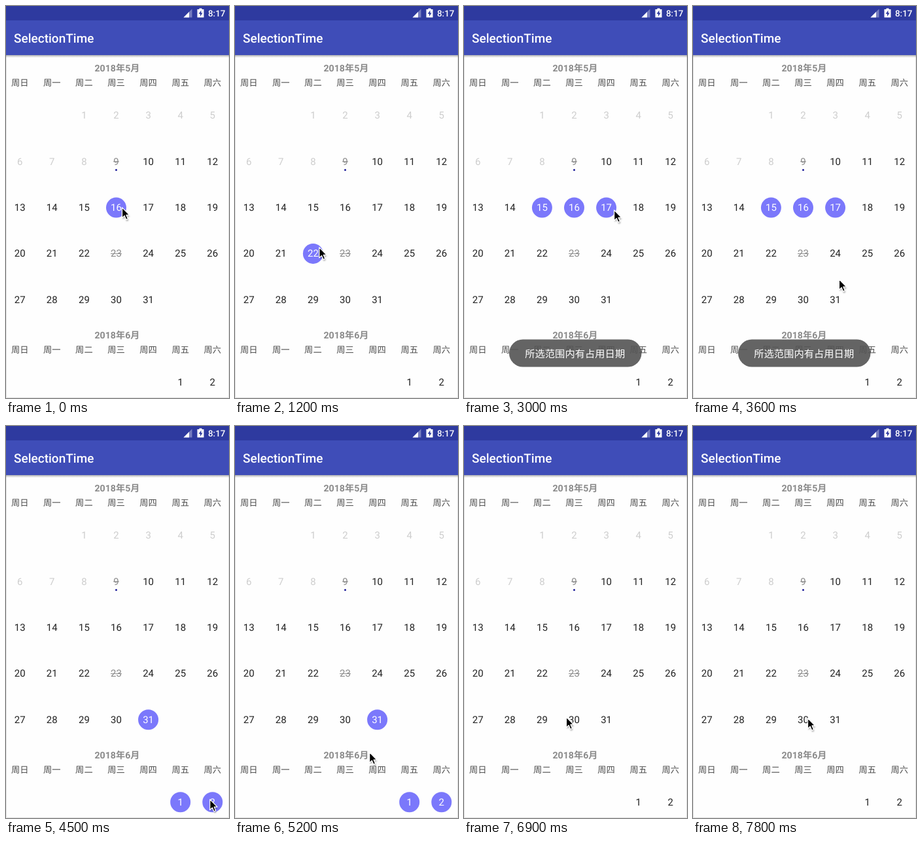
These frames come from a looping animation (341x599 px, 7900 ms). An HTML page:

```html
<!DOCTYPE html>
<html lang="zh-CN">
<head>
<meta charset="utf-8">
<title>SelectionTime</title>
<style>
  html, body { margin: 0; width: 100%; height: 100%; overflow: hidden; background: #fff; }
  svg { display: block; width: 341px; height: 599px; }
  text { font-family: Roboto, "Noto Sans CJK SC", "Noto Sans CJK", sans-serif; text-rendering: geometricPrecision; }
  .mid { text-anchor: middle; }
  .month { font-size: 14.2px; font-weight: 700; fill: #8b8b8b; }
  .week { font-size: 13.3px; fill: #4c4c4c; }
  .day { font-size: 15px; fill: #222; }
  .past { fill: #cdcdcd; }
  .busy { fill: #8a8a8a; }
  .mark { fill: #7b78fb; visibility: hidden; }
  .on .mark { visibility: visible; }
  .on .day { fill: #fff; }
</style>
</head>
<body>
<svg viewBox="0 0 341 599">
  <defs>
    <linearGradient id="shade" x2="0" y2="1">
      <stop offset="0" stop-color="#000" stop-opacity=".3"/>
      <stop offset="1" stop-color="#000" stop-opacity="0"/>
    </linearGradient>
    <filter id="soft" x="-50%" y="-50%" width="200%" height="200%">
      <feGaussianBlur stdDeviation="1.2"/>
    </filter>
  </defs>
  <rect width="341" height="599" fill="#fefefe"/>
  <path d="M.5 75V598.5H340.5V75" fill="none" stroke="#e2e2e2"/>
  <g id="calendar"></g>

  <rect y="75" width="341" height="4" fill="url(#shade)"/>
  <rect width="341" height="75" fill="#3f4db8"/>
  <rect width="341" height="22" fill="#2e3a9f"/>
  <text x="12" y="56" font-size="19" font-weight="500" fill="#fff">SelectionTime</text>
  <path d="M271.5 17.5H284.5V4.5Z" fill="#fff" opacity=".35"/>
  <path d="M271.5 17.5H280V9Z" fill="#fff"/>
  <path d="M292.5 5H295.5V3.5H299.5V5H302.5V17.5H292.5Z" fill="#fff"/>
  <path d="M298.4 6.5L294.7 12H297V16L300.6 10.5H298.4Z" fill="#2e3a9f"/>
  <text x="309" y="16" font-size="13.4" font-weight="500" fill="#fff">8:17</text>

  <g id="toast" opacity="0">
    <rect x="69" y="509.5" width="202.5" height="42" rx="21" fill="#555" opacity=".91"/>
    <text class="mid" x="169.7" y="536.5" font-size="15.3" fill="#fff">所选范围内有占用日期</text>
  </g>

  <g id="cursor">
    <path d="M1 3V18L4.5 15L7 21L10 19.5L7.5 14H12Z" opacity=".35" filter="url(#soft)"/>
    <path d="M0 0V16L3.7 12.6L6.2 18.5L9 17.3L6.5 11.5H11.3Z" stroke="#fff" stroke-width="1.3" stroke-linejoin="round"/>
  </g>
</svg>
<script>
const LOOP = 7900, STEP = 100, TRAVEL = 650;
const $ = id => document.getElementById(id);
const clamp = p => Math.min(1, Math.max(0, p));
const smooth = p => p * p * (3 - 2 * p);

// Days are numbered from 1 May, so 32 is 1 June.
const BUSY = [9, 23], TODAY = 9, MAY = 31;
const colX = c => 21.2 + c * 49.1;

function place(day) {
  const june = day > MAY;
  const i = june ? day - MAY + 4 : day + 1;
  return { x: colX(i % 7), y: (june ? 574.6 : 167.3) + Math.floor(i / 7) * 70.3 };
}

const label = (cls, x, y, s) => `<text class="mid ${cls}" x="${x}" y="${y}">${s}</text>`;

function dayCell(day) {
  const { x, y } = place(day), busy = BUSY.includes(day);
  const half = day > 9 ? 8.5 : 4.5;
  const kind = busy ? 'busy' : day < TODAY ? 'past' : '';
  let s = `<circle class="mark" cx="${x}" cy="${y + .2}" r="15.5"/>`;
  s += label('day ' + kind, x, y + 5, day > MAY ? day - MAY : day);
  if (busy) s += `<path d="M${x - half} ${y + .2}h${half * 2}" stroke="#8a8a8a"/>`;
  if (day === TODAY) s += `<circle cx="${x}" cy="${y + 13}" r="1.5" fill="#1c1c98"/>`;
  return `<g class="cell">${s}</g>`;
}

function monthHead(month, top) {
  const week = [...'日一二三四五六'].map((w, c) => label('week', colX(c), top + 21.8, '周' + w));
  return label('month', 170, top, `2018年${month}月`) + week.join('');
}

const days = Array.from({ length: MAY + 2 }, (_, i) => i + 1);
$('calendar').innerHTML = monthHead(5, 100.2) + monthHead(6, 508.2) + days.map(dayCell).join('');
const cells = document.querySelectorAll('.cell');

// Each stop: tap time, day, and pointer offset from the day's centre.
const stops = [
  { t: 0, day: 16, dx: 9, dy: 0 },
  { t: 400, day: 16, dx: 9, dy: 0 },
  { t: 1000, day: 22, dx: 2, dy: -10 },
  { t: 1700, day: 24, dx: 4, dy: -1 },
  { t: 2400, day: 15, dx: 4, dy: 1 },
  { t: 2900, day: 17, dx: 12, dy: 4 },
  { t: 3800, day: 31, dx: 4, dy: 0 },
  { t: 4400, day: 33, dx: -4, dy: -4 },
  { t: 5500, day: 29, dx: 2, dy: -7 },
  { t: 6500, day: 29, dx: 2, dy: -7 },
  { t: 7100, day: 30, dx: 7, dy: -2, hover: true }
];

// A tap starts, extends or clears the range; a range may not span a busy day.
function tap(state, day) {
  const { from, to } = state;
  if (!from || from !== to || day < from) return { from: day, to: day };
  if (day === from) return { from: 0, to: 0 };
  return BUSY.some(b => b > from && b < day) ? state : { from, to: day };
}

const tip = s => ({ x: place(s.day).x + s.dx, y: place(s.day).y + s.dy });

function pointer(t) {
  const next = stops.findIndex(s => s.t > t);
  if (next < 0) return tip(stops[stops.length - 1]);
  const a = stops[next - 1], b = stops[next];
  const span = Math.min(TRAVEL, b.t - a.t - STEP);
  const p = smooth(clamp((t - b.t + span) / span));
  const u = tip(a), v = tip(b);
  return { x: u.x + (v.x - u.x) * p, y: u.y + (v.y - u.y) * p };
}

function draw(t) {
  const { x, y } = pointer(t);
  $('cursor').setAttribute('transform', `translate(${x} ${y})`);
  $('toast').setAttribute('opacity', clamp(Math.min((t - 1660) / 400, (4100 - t) / 300)));
  const { from, to } = stops.filter(s => s.t <= t && !s.hover)
    .reduce((state, s) => tap(state, s.day), { from: 0, to: 0 });
  cells.forEach((c, i) => c.classList.toggle('on', i + 1 >= from && i + 1 <= to));
}

const start = performance.now();
function tick() {
  const t = (performance.now() - start) % LOOP;
  draw(Math.floor(t / STEP) * STEP);
  requestAnimationFrame(tick);
}
tick();
</script>
</body>
</html>
```
